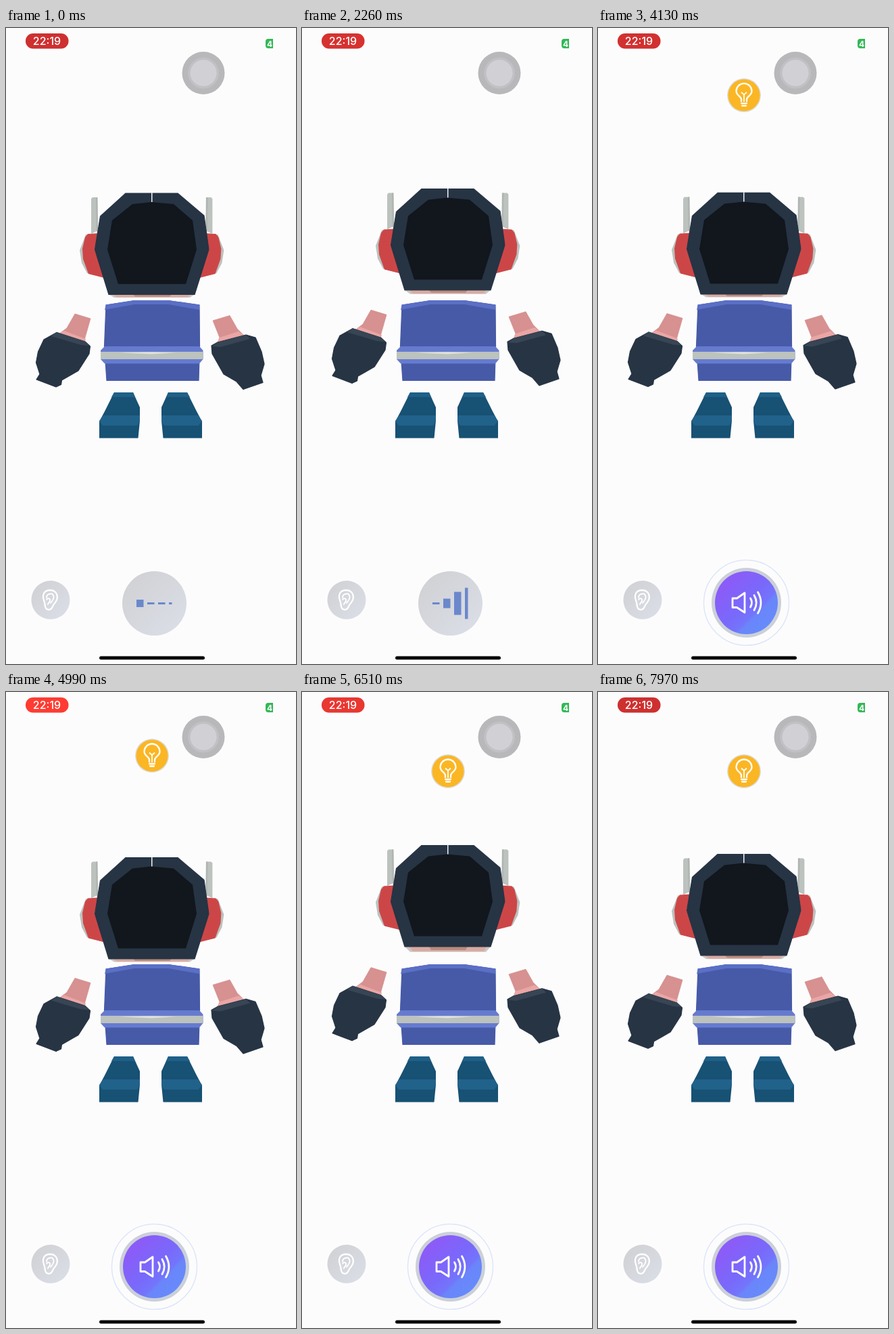
These frames come from a looping animation (429 by 939 pixels, 8000 ms). An HTML page:

```html
<!DOCTYPE html>
<html lang="en">
<head>
<meta charset="utf-8">
<title>Talking robot</title>
<style>
  html, body { margin: 0; width: 100%; height: 100%; overflow: hidden; background: #fdfcfd; }
  svg { display: block; width: 100%; height: 100%; }
  text { font-family: Inter, Roboto, sans-serif; fill: #fff; text-anchor: middle; }
  .navy { fill: #263444; stroke: #263444; stroke-width: 1.2; stroke-linejoin: round; }
  .edge { fill: #374554; }
  .steel { fill: #bcc2be; }
  .red { fill: #cd4647; }
  .skin { fill: #d69190; stroke: #d69190; stroke-width: .8; }
  .cuff { fill: #eaa6a5; }
  .trim { fill: #667bcf; }
  .cloth { fill: #475aa7; stroke: #475aa7; stroke-width: 1.2; }
  .icon { fill: none; stroke: #fff; stroke-linecap: round; stroke-linejoin: round; }
</style>
</head>
<body>
<svg viewBox="0 0 429 939">
  <defs>
    <linearGradient id="pale" x1="0" y1="0" x2="1" y2="1">
      <stop offset=".2" stop-color="#d2d3d7"/><stop offset="1" stop-color="#dbdfe8"/>
    </linearGradient>
    <linearGradient id="violet" x1=".1" y1=".1" x2=".9" y2=".9">
      <stop offset=".12" stop-color="#8b5cf7"/><stop offset=".5" stop-color="#7969fb"/>
      <stop offset=".68" stop-color="#7375fb"/><stop offset=".72" stop-color="#6a85fa"/>
      <stop offset="1" stop-color="#668cfb"/>
    </linearGradient>
    <g id="ear">
      <path class="steel" d="M118 305L109 328 112 347 120 362 146 369 136 304Z"/>
      <path class="red" d="M121 304L137 303 131 327 146 369 122 363 114 341 113 326 117 309Z"/>
      <path class="steel" d="M126 252L128 250 135 250 136 299 126 304Z"/>
      <path fill="#aeb4b0" d="M133 250h2.500l.5 49-2 2Z"/>
    </g>
    <g id="leg">
      <path fill="#175173" d="M160 538H188L198 560 198 580 195.500 605.500H138V581L146 566Z"/>
      <path fill="#1f6088" d="M160 538H188L191 545H156Z"/>
      <path fill="#21628b" d="M144 572H198V580L194 587H143L138 580Z"/>
    </g>
  </defs>

  <rect id="pill" x="29" y="8" width="63.500" height="22.500" rx="11"/>
  <text x="60.500" y="24.800" font-size="16" font-weight="500">22:19</text>
  <path fill="#34b857" d="M388 16H395V30H388Q384 30 384 26V20Q384 16 388 16Z"/>
  <text x="390" y="27.500" font-size="12" font-weight="700">4</text>

  <circle cx="292" cy="66.500" r="31.500" fill="#b8b7ba"/>
  <circle cx="292" cy="66.500" r="23" fill="#c1c1c5"/>
  <circle cx="292" cy="66.500" r="19.500" fill="#d0d0d5"/>

  <g id="head">
    <use href="#ear"/>
    <use href="#ear" transform="matrix(-1 0 0 1 431.400 0)"/>
    <g id="chin">
      <path fill="#cbc6c2" d="M152 0H279L272 4.500H160Z"/>
      <path fill="#d8aaa2" d="M158 0H273L269 4H164Z"/>
      <path fill="#b98a7c" d="M188 0H245L242 3H191Z"/>
    </g>
    <path class="navy" d="M177 244H254L293 277 300 327 279 393.500H152L131.500 327 139.500 278Z"/>
    <path fill="#12161d" d="M187 260L215 257 248 260 276 284 282 327 266 378H166L150 327 157 284Z"/>
    <path fill="#f4f4f5" d="M215 243h1.500v14h-1.500Z"/>
  </g>

  <g id="arms">
    <path class="skin" d="M102 422L125 429 115 464 78 452 90 443Z"/>
    <path class="cuff" d="M77 452L86 447 118 459 116 466Z"/>
    <path class="navy" d="M75 449.500L117 463 124.500 470 123 481 107 506 82.500 520 81.500 526.500 74 530 45 519 50 511 44.500 494 47.500 478 56 460Z"/>
    <path class="edge" d="M75 449L117 463 124 469 111 468 67 455Z"/>
    <path class="skin" d="M306 432L331 424.500 342 444 353 455 313 465 316 457Z"/>
    <path class="cuff" d="M313 464L316 457 344 448 354 455Z"/>
    <path class="navy" d="M313 464L355 453 369 457 378 478 382 496 377 513 380 523.500 351 533.500 341 522 322 511 305 481 304 469Z"/>
    <path class="edge" d="M313 464L355 453 361 459 317 471 305 470Z"/>
  </g>

  <path class="cloth" d="M148 409L190 402.500H240L286 409 286.500 470 285 520.500H149L145.500 470Z"/>
  <path fill="#5a6fc5" d="M148 408.500L190 402H240L286 408.500V416L240 408H190L146 416Z"/>
  <path class="trim" d="M146 470H286L291.500 476V489L286 495.500H146L140 489V476Z"/>
  <path class="steel" d="M140 478H291.500V489H140Z"/>
  <path fill="#dfe2e0" d="M168 479.500L215 478.500 252 479.500 215 481.500Z"/>

  <use href="#leg"/>
  <use href="#leg" transform="matrix(-1 0 0 1 428 0)"/>

  <g id="bulb">
    <circle r="25" fill="#dcdcd8"/>
    <circle r="23.500" fill="#fbb624"/>
    <path class="icon" stroke-width="2.300" d="M-4 9V6C-4 2-11.500 0-11.500-6A11.500 11.500 0 0 1 11.500-6C11.500 0 4 2 4 6V9M-4 12H4M-3 15.500H3"/>
    <path class="icon" stroke-width="1.800" d="M0 9V-1L-3.500-4M0-1L3.500-4"/>
  </g>

  <circle cx="66" cy="844.500" r="28.500" fill="url(#pale)"/>
  <path class="icon" stroke-width="2.300" d="M56 845C53 836 57 830 65 830S77 836 75.500 843C74.500 848 71 849 69.500 853C68 858 64 860 60.500 858C57 856 58 851 57 848Z"/>
  <path class="icon" stroke-width="1.900" d="M60 841C60 835 69 833 70.500 839C71.500 843 68 846 66 849M60 844C62 841 66 842 65 846C64.500 848 62 849 62 851"/>

  <g id="listen">
    <circle cx="219.500" cy="849.500" r="47.500" fill="url(#pale)"/>
    <g id="bars" fill="#6b88cc"></g>
  </g>

  <g id="speak" transform="translate(219.500 848.500)">
    <circle id="ring" fill="none" stroke="#dce6f8" stroke-width="1.500"/>
    <circle id="rim" fill="#cbd0d9"/>
    <circle r="46.500" fill="url(#violet)"/>
    <path class="icon" stroke-width="2.800" d="M-20.500-6.500H-14L-2.500-14.500V14.500L-14 7H-20.500ZM6-6.500Q10 0 6 6.500M11.500-11Q18 0 11.500 11M17-15.500Q26 0 17 15.500"/>
  </g>

  <rect x="138" y="927.500" width="156" height="5" rx="2.500" fill="#050505"/>
</svg>
<script>
const LOOP = 8000, SPEAK_AT = 3000;
const $ = id => document.getElementById(id);
const clamp = x => Math.max(0, Math.min(1, x));
const mix = (a, b, k) => a + (b - a) * k;

// Eased value through [time, value] keys.
function track(keys, t) {
  let i = 0;
  while (i < keys.length - 2 && t > keys[i + 1][0]) i++;
  const [[t0, a], [t1, b]] = [keys[i], keys[i + 1]];
  const k = clamp((t - t0) / (t1 - t0));
  return mix(a, b, k * k * (3 - 2 * k));
}

const lift = [[0, 0], [1140, 3], [2260, 6.5], [3340, 1.5], [4990, -0.5], [6510, 17.5], [7970, 4.5]];
const bulbY = [[3000, 108], [3340, 104], [4990, 94], [6510, 117], [7970, 117]];
const levels = [[11, 3, 3], [3, 9, 14], [3, 27, 34], [3, 48, 46]];
const barTimes = [0, 1140, 2260];

const bars = levels.map((_, i) => {
  const bar = document.createElementNS("http://www.w3.org/2000/svg", "rect");
  bar.setAttribute("x", 193 + i * 16);
  bar.setAttribute("width", i < 3 ? 10.5 : 4.5);
  return $("bars").appendChild(bar);
});

function draw(now) {
  const t = now % LOOP;

  const glow = (1 - Math.cos(t / 1992 * 2 * Math.PI)) / 2;
  $("pill").setAttribute("fill", `rgb(${mix(206, 254, glow)},${mix(48, 60, glow)},${mix(48, 50, glow)})`);

  const up = track(lift, t);
  $("head").setAttribute("transform", `translate(0 ${-up})`);
  $("arms").setAttribute("transform", `translate(0 ${-up * 0.87})`);
  $("chin").setAttribute("transform", `translate(0 393.5) scale(1 ${1 + up * 0.04})`);

  const speaking = t >= SPEAK_AT;
  $("listen").style.display = speaking ? "none" : "";
  $("speak").style.display = $("bulb").style.display = speaking ? "" : "none";

  if (speaking) {
    const grow = 1 - (1 - clamp((t - SPEAK_AT) / 700)) ** 2;
    $("ring").setAttribute("r", mix(50, 63, grow));
    $("rim").setAttribute("r", mix(47.5, 51.5, grow));
    const pop = clamp((t - SPEAK_AT) / 200);
    $("bulb").setAttribute("transform", `translate(216 ${track(bulbY, t)}) scale(${pop})`);
  } else {
    bars.forEach((bar, i) => {
      const h = track(barTimes.map((time, k) => [time, levels[i][k]]), t);
      bar.setAttribute("height", h);
      bar.setAttribute("y", 849.5 - h / 2);
    });
  }
}

const start = performance.now();
function frame() {
  draw(performance.now() - start);
  requestAnimationFrame(frame);
}
frame();
</script>
</body>
</html>
```
